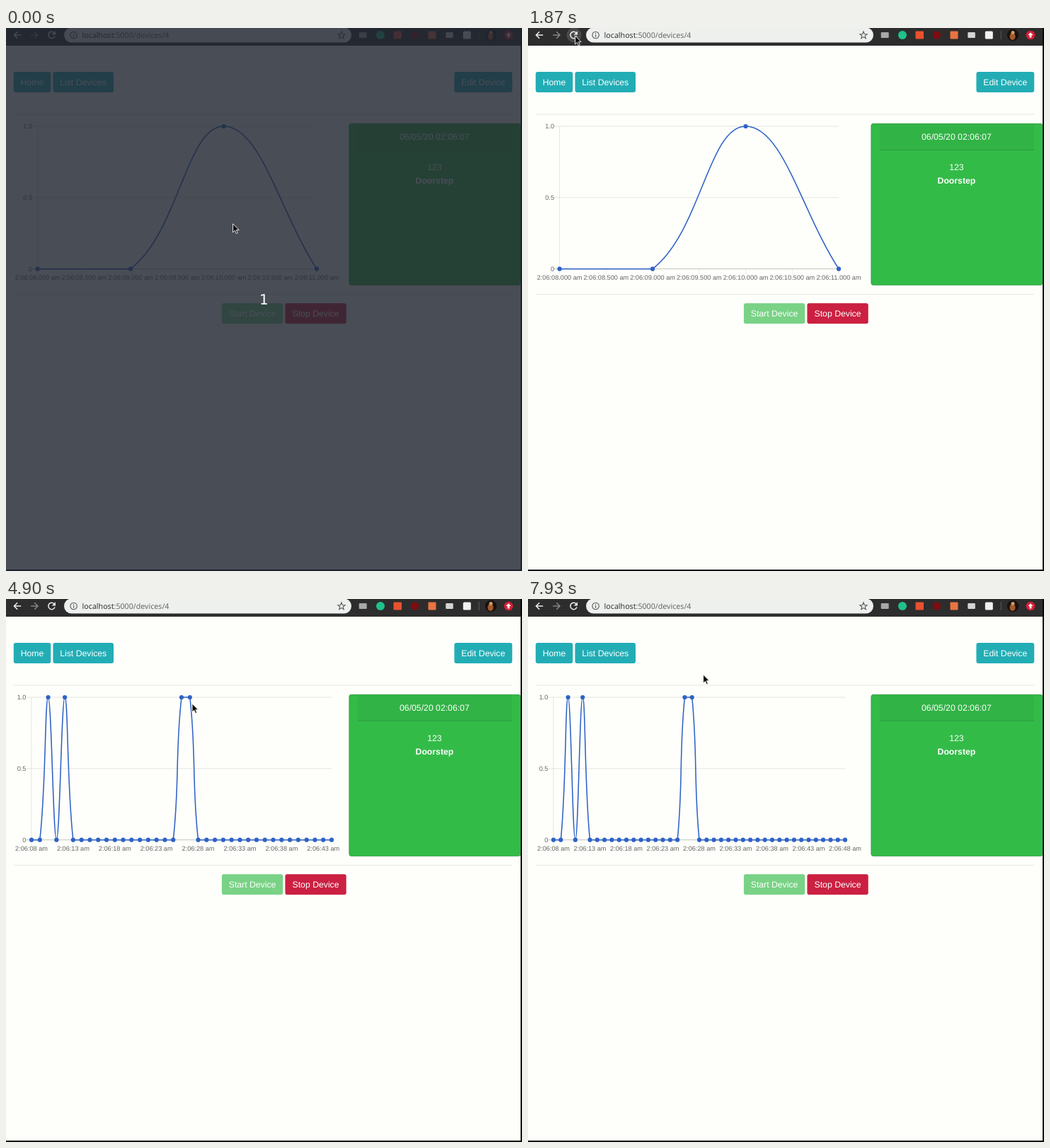
Recreate the animation shown at these times as an HTML page. Size 729x768 px, loop 8000 ms.

```html
<!DOCTYPE html>
<html lang="en">
<head>
<meta charset="utf-8">
<title>Device page</title>
<style>
  html, body { margin: 0; width: 100%; height: 100%; overflow: hidden; background: #000; }
  svg { display: block; width: 729px; height: 768px; }
  text { font: 12.24px "Liberation Sans", Arial, sans-serif; text-rendering: geometricPrecision; white-space: pre; }
  .axis { font-size: 9.18px; fill: #666; }
  .ui { font-family: "Noto Sans", "Open Sans", sans-serif; }
  .mid { text-anchor: middle; }
  .end { text-anchor: end; }
</style>
</head>
<body>
<svg id="stage" viewBox="0 0 729 768" xmlns="http://www.w3.org/2000/svg"></svg>
<script>
const LOOP = 8000;
const stage = document.getElementById('stage');

function add(parent, tag, attrs = {}, text) {
  const node = document.createElementNS('http://www.w3.org/2000/svg', tag);
  for (const key in attrs) node.setAttribute(key, attrs[key]);
  if (text !== undefined) node.textContent = text;
  parent.appendChild(node);
  return node;
}
const group = (parent = stage) => add(parent, 'g');
const rect = (p, x, y, width, height, fill, rx = 0, more = {}) =>
  add(p, 'rect', { x, y, width, height, fill, rx, ...more });
const circle = (p, cx, cy, r, fill, more = {}) => add(p, 'circle', { cx, cy, r, fill, ...more });
const line = (p, d, stroke, width, more = {}) =>
  add(p, 'path', { d, stroke, 'stroke-width': width, fill: 'none', ...more });
const label = (p, x, y, str, fill, cls = '', more = {}) =>
  add(p, 'text', { x, y, fill, class: cls, ...more }, str);
const show = (node, on) => node.setAttribute('visibility', on ? 'visible' : 'hidden');

// Page
rect(stage, 0, 0, 729, 768, '#050505');
rect(stage, 0, 25, 727, 741, '#fefffb');

function button(x, y, width, str, fill, opacity = 1) {
  const g = group();
  g.setAttribute('opacity', opacity);
  rect(g, x, y, width, 29, fill, 3);
  label(g, x + width / 2, y + 18.7, str, '#fff', 'mid');
}
button(10.8, 62, 52.5, 'Home', '#22adb5');
button(66.4, 62, 85.6, 'List Devices', '#22adb5');
button(633.4, 62, 81.8, 'Edit Device', '#22adb5');
button(304.9, 389.3, 86.3, 'Start Device', '#33bb48', 0.65);
button(394.4, 389.3, 86.3, 'Stop Device', '#cb2041');
for (const y of [122, 376.6]) line(stage, `M11 ${y}H715`, '#000', 0.8, { opacity: 0.13 });

// Device card
rect(stage, 484.9, 135.3, 242, 228.3, '#33bb48', 3, { stroke: '#2a963b', 'stroke-width': 0.8 });
rect(stage, 497, 135.7, 218, 37, '#000', 0, { opacity: 0.045 });
line(stage, 'M497 172.6H715', '#000', 0.8, { opacity: 0.16 });
label(stage, 605.4, 157.7, '06/05/20 02:06:07', '#fff', 'mid');
label(stage, 605.4, 201.4, '123', '#fff', 'mid');
label(stage, 605.4, 219.7, 'Doorstep', '#fff', 'mid', { style: 'font-weight:700' });

// Line chart: one reading per second, every value 0 or 1
const TOP = 139, BASE = 340.7;

function smoothPath(pts) {
  const clamp = y => Math.min(BASE, Math.max(TOP, y));
  const dist = (a, b) => Math.hypot(a[0] - b[0], a[1] - b[1]);
  const handles = pts.map((cur, i) => {
    const prev = pts[i - 1] || cur, next = pts[i + 1] || cur;
    const before = dist(prev, cur), after = dist(cur, next);
    const grip = part => {
      const f = 0.4 * part / (before + after);
      return [f * (next[0] - prev[0]), f * (next[1] - prev[1])];
    };
    const a = grip(before), b = grip(after);
    return {
      back: [cur[0] - a[0], clamp(cur[1] - a[1])],
      ahead: [cur[0] + b[0], clamp(cur[1] + b[1])]
    };
  });
  return pts.map((p, i) => i
    ? `C${handles[i - 1].ahead} ${handles[i].back} ${p}`
    : `M${p}`).join('');
}

function chart(left, right, seconds, tick, peaks) {
  const g = group();
  const xAt = s => left + (right - left) * s / seconds;
  [['1.0', TOP], ['0.5', (TOP + BASE) / 2], ['0', BASE]].forEach(([str, y], i) => {
    line(g, `M${left - 7.6} ${y}H${right}`, '#000', 0.8, { opacity: i === 2 ? 0.3 : 0.13 });
    label(g, left - 7.6, y + 3.2, str, '#666', 'axis end');
  });
  line(g, `M${left} ${TOP}V${BASE}`, '#000', 0.8, { opacity: 0.13 });
  for (let s = 0; s <= seconds; s += tick) {
    const whole = String(8 + Math.floor(s)).padStart(2, '0');
    const part = tick < 1 ? (s % 1).toFixed(3).slice(1) : '';
    line(g, `M${xAt(s)} ${BASE}v7.6`, '#000', 0.8, { opacity: 0.1 });
    label(g, xAt(s), 356.3, `2:06:${whole}${part} am`, '#666', 'axis mid');
  }
  const pts = Array.from({ length: seconds + 1 }, (_, s) => [xAt(s), peaks.includes(s) ? TOP : BASE]);
  line(g, smoothPath(pts), '#2f62c6', 1.55, { 'stroke-linejoin': 'round' });
  for (const [x, y] of pts) circle(g, x, y, 3.1, '#2f62c6');
  return g;
}
const charts = [
  { from: 0, node: chart(44.6, 439, 3, 0.5, [2]) },
  { from: 3170, node: chart(36, 460, 36, 5, [2, 4, 18, 19]) },
  { from: 7170, node: chart(36, 448, 40, 5, [2, 4, 18, 19]) }
];

// Browser bar
rect(stage, 0, 0, 727, 25, '#2d2d2d');
const hover = circle(stage, 65, 10, 10.5, '#4a4a4a');
line(stage, 'M21.2 10H11.6M16.2 5.2L11.4 10l4.8 4.8', '#eee', 1.5);
line(stage, 'M35.2 10H44.8M40.2 5.2L45 10l-4.8 4.8', '#858585', 1.5);
const reload = group();
line(reload, 'M69 11.6A4.7 4.7 0 1 1 68 6.7', '#eee', 1.5);
add(reload, 'path', { d: 'M70 4.3v5.3h-5.3z', fill: '#eee' });
const stop = line(stage, 'M60.6 5.7l8.6 8.6M69.2 5.7l-8.6 8.6', '#eee', 1.5);

rect(stage, 82, -0.5, 406, 21, '#eef0ee', 10.5);
circle(stage, 95.6, 10, 4.7, 'none', { stroke: '#55585a', 'stroke-width': 1.1 });
line(stage, 'M95.6 9.3v3.5M95.6 7v1.3', '#55585a', 1.2);
const url = label(stage, 107.6, 13.8, '', '#333', 'ui', { style: 'font-size:10.65px' });
add(url, 'tspan', {}, 'localhost');
add(url, 'tspan', { fill: '#666' }, ':5000/devices/4');
const star = Array.from({ length: 10 }, (_, i) => {
  const r = i % 2 ? 2.3 : 5.4, a = Math.PI * (i / 5 - 0.5);
  return [474 + r * Math.cos(a), 10.3 + r * Math.sin(a)];
});
add(stage, 'polygon', { points: star.join(' '), fill: 'none', stroke: '#55585a', 'stroke-width': 1.1 });

rect(stage, 498.7, 6, 11, 8, '#a6a9a8', 1);
circle(stage, 529, 10, 6, '#1fc28b');
rect(stage, 547.5, 4.5, 11.5, 11, '#e9512f', 1);
circle(stage, 577.5, 10, 5.8, '#7d0d12');
rect(stage, 596.5, 4.5, 11, 11, '#ea7442', 1);
rect(stage, 621.3, 6, 10.5, 8, '#d3d5d3', 1);
rect(stage, 645.8, 4.5, 11, 11, '#f2f2f0', 1.5);
line(stage, 'M668.3 4V16', '#5c5c5c', 1);
circle(stage, 685, 10, 8.2, '#17120f');
add(stage, 'ellipse', { cx: 684.5, cy: 12, rx: 4, ry: 5, fill: '#a65a2c' });
circle(stage, 685, 6.5, 2.5, '#d19a62');
circle(stage, 710, 10, 6.3, '#d71f35');
add(stage, 'path', { d: 'M710 6.2l3.6 3.9h-2.2v3.4h-2.8v-3.4h-2.2z', fill: '#fff' });

// Status bubble, tooltip, countdown
const status = group();
add(status, 'path', { d: 'M0 749H237q3 0 3 3V766H0z', fill: '#2d2d2d' });
label(status, 3, 761, 'Waiting for localhost...', '#a9a9a9', 'ui', { style: 'font-size:9.75px' });

const tip = group();
rect(tip, 0, 0, 95, 26, '#2b2b2b', 2);
label(tip, 47.5, 16.5, 'Reload this page', '#eee', 'ui mid', { style: 'font-size:10px' });

const countdown = group();
rect(countdown, 0, 0, 729, 768, '#232832', 0, { opacity: 0.823 });
label(countdown, 364.3, 390.6, '1', '#fff', 'mid', { style: 'font:20px "DejaVu Sans",sans-serif' });

const pointer = add(stage, 'path', {
  d: 'M.6 .9V13l2.8-2.6 1.9 4.3 2-.9-1.9-4.1h3.8z',
  fill: '#0a0a0a', stroke: '#fff', 'stroke-width': 0.9, 'stroke-linejoin': 'round'
});

// Pointer moves: first step, last step, number of steps, end point
const START = [320, 276];
const moves = [
  [700, 1430, 12, 66.5, 9.5],
  [1530, 1530, 1, 66, 10],
  [2300, 2930, 9, 256.3, 147.6],
  [4400, 4400, 1, 257, 148],
  [4600, 4600, 1, 263.5, 147.5],
  [4900, 4900, 1, 262.4, 147],
  [5100, 5200, 2, 153, 55],
  [5400, 5800, 6, 60.5, 8],
  [6370, 6730, 6, 248, 105.7],
  [7830, 7930, 2, 247, 106]
];

function pointerAt(t) {
  let [x, y] = START;
  for (const [from, to, steps, ex, ey] of moves) {
    if (t < from) break;
    const gap = steps > 1 ? (to - from) / (steps - 1) : 1;
    const p = Math.min(steps, Math.floor((t - from) / gap + 0.001) + 1) / steps;
    const k = p * p * (3 - 2 * p);
    x += (ex - x) * k;
    y += (ey - y) * k;
  }
  return [x, y];
}

const within = (t, a, b) => t >= a && t < b;

// Opacity of a bubble that fades in quickly and leaves in four steps
function bubble(t, on, off, end) {
  if (!within(t, on, end)) return 0;
  if (t < off) return Math.min(1, (t - on + 40) / 120);
  return 1 - (Math.floor((t - off) / (end - off) * 3) + 1) / 4;
}

function render(t) {
  const [x, y] = pointerAt(t);
  const loading = within(t, 2230, 3170) || within(t, 6130, 7170);
  pointer.setAttribute('transform', `translate(${x} ${y})`);
  tip.setAttribute('transform', `translate(${x + 5} ${y + 13})`);
  status.setAttribute('opacity', bubble(t, 2300, 3500, 3600) + bubble(t, 6440, 7430, 7570));
  show(tip, within(t, 1830, 1870) || within(t, 6000, 6070));
  show(hover, Math.hypot(x - 65, y - 10) < 12);
  show(reload, !loading);
  show(stop, loading);
  show(countdown, t < 100);
  charts.forEach((c, i) => show(c.node, within(t, c.from, charts[i + 1]?.from ?? LOOP)));
}

const begin = performance.now();
function tick() {
  render((performance.now() - begin) % LOOP);
  requestAnimationFrame(tick);
}
tick();
</script>
</body>
</html>
```
